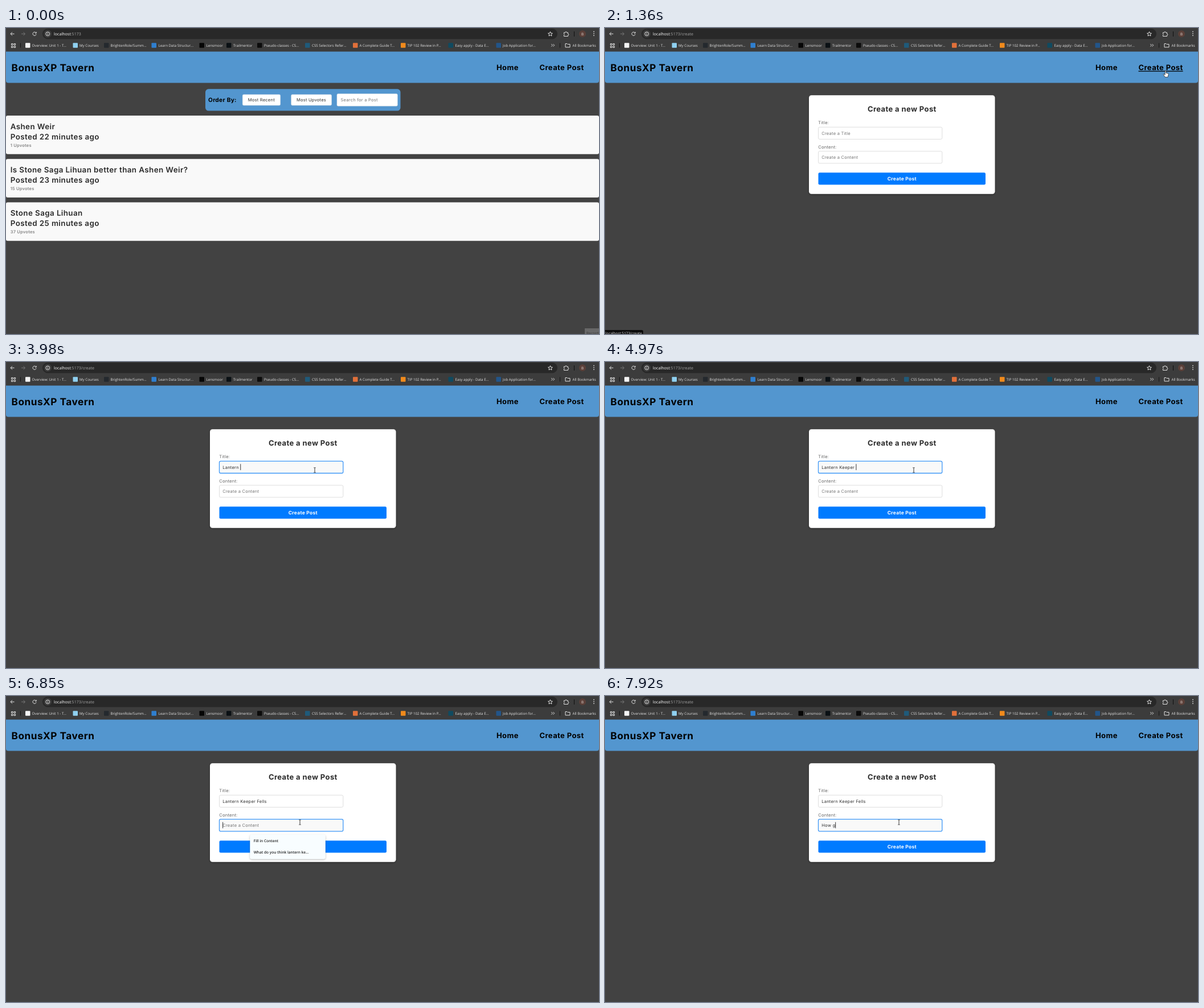
An HTML page for the animation above (7.99 s loop, 1041 by 538 pixels).

```html
<!DOCTYPE html>
<html lang="en">
<head>
<meta charset="utf-8">
<title>Post board</title>
<style>
  html, body { margin: 0; height: 100%; overflow: hidden; background: #424242; }
  svg { display: block; width: 100%; height: 100%; }
  text { font-family: Inter, sans-serif; letter-spacing: .03em; white-space: pre; text-rendering: geometricPrecision; }
  .ui, .ui text { font-family: "Open Sans", "Noto Sans", sans-serif; letter-spacing: 0; }
  .b { font-weight: 700; }
  .s { font-weight: 600; }
  .h2 { font-size: 13.4px; fill: #2b2b2b; }
  .nav { font-size: 13px; }
  .f { font-size: 7.55px; fill: #333; }
  .ph { fill: #777; }
  .line { fill: none; stroke: #e3e3e3; stroke-width: 1; }
  .field { fill: #fff; stroke: #d6d6d6; stroke-width: .8; }
  .field.on { fill: #f9f9f9; stroke: #3d97f7; stroke-width: 1.3; }
  .u { text-decoration: underline; text-decoration-thickness: 1px; }
</style>
</head>
<body>
<svg viewBox="0 0 1041 538" preserveAspectRatio="none">
  <defs>
    <filter id="soft" x="-10%" y="-10%" width="120%" height="130%">
      <feDropShadow dx="0" dy="1.2" stdDeviation="1.6" flood-opacity=".3"/>
    </filter>
  </defs>
  <rect width="1041" height="538" fill="#424242"/>

  <g class="ui" id="chrome">
    <rect width="1041" height="41.5" fill="#3c3c3c"/>
    <rect x="64" y="1" width="904" height="18.5" rx="9.2" fill="#282828"/>
    <path class="line" d="M14.5 10.3H8.3M11 7.3l-3 3 3 3"/>
    <path class="line" style="stroke:#777" d="M27 10.3h6.2M30.5 7.3l3 3-3 3"/>
    <path class="line" d="M52.6 8.4a3.1 3.1 0 1 0 .5 2.6M53.2 6.8v2.3h-2.3"/>
    <circle cx="73.3" cy="10.3" r="6.8" fill="#3c3c3c"/>
    <circle class="line" cx="73.3" cy="10.3" r="3.4" stroke-width=".8"/>
    <path class="line" d="M73.3 9.8v2.4M73.3 8.2v.9"/>
    <text x="84" y="12.9" font-size="7.1" fill="#fff">localhost<tspan id="path" fill="#a5a5a5"></tspan></text>
    <path class="line" stroke-width=".8" d="M955.5 6.5l1.1 2.6 2.8.2-2.1 1.9.7 2.8-2.5-1.5-2.5 1.5.7-2.8-2.1-1.9 2.8-.2z"/>
    <path class="line" d="M979.5 8h2.3a1.3 1.3 0 0 1 2.6 0h2.1v2.2a1.3 1.3 0 0 1 0 2.6v1.7h-7v-2.2a1.2 1.2 0 0 0 0-2.2z"/>
    <path d="M997.5 6v9" stroke="#111"/>
    <circle cx="1012" cy="10.3" r="6" fill="#5b4039"/>
    <text x="1012" y="12.6" font-size="6.2" fill="#e9dcd8" text-anchor="middle">B</text>
    <path d="M1032 6.4v9" stroke="#e3e3e3" stroke-width="1.7" stroke-linecap="round" stroke-dasharray="0 3.4"/>
    <path class="line" d="M9.5 27.5h2.6v2.4H9.5zM14 27.5h2.6v2.4H14zM9.5 32h2.6v2.4H9.5zM14 32h2.6v2.4H14z"/>
    <path d="M25.5 26.5v8M972.5 26.5v8" stroke="#151515"/>
    <path class="line" d="M957.3 28.2l2.2 2.2-2.2 2.2M960.5 28.2l2.2 2.2-2.2 2.2"/>
    <path class="line" stroke-width=".8" d="M982 27.5h3l1 1.1h4v5.2h-8z"/>
    <text x="994.5" y="32.8" font-size="6.2" fill="#e3e3e3">All Bookmarks</text>
  </g>

  <path d="M0 41.5H1041V92.500a4 4 0 0 1-4 4H4a4 4 0 0 1-4-4z" fill="#5396cf"/>
  <text class="b" x="9.500" y="76" font-size="17.2">BonusXP Tavern</text>
  <text class="b nav" id="home" x="861" y="74.300">Home</text>
  <text class="b nav" id="create" x="936.500" y="74.300">Create Post</text>

  <g id="feed">
    <rect x="350" y="107.300" width="342.500" height="38.200" rx="5.500" fill="#5396cf"/>
    <text class="b" x="355" y="130.200" font-size="10.200">Order By:</text>
    <g fill="#fff" stroke="#d5dde5" stroke-width=".6">
      <rect x="415.300" y="117" width="66.300" height="19" rx="2"/>
      <rect x="500.700" y="117" width="70.800" height="19" rx="2"/>
      <rect x="581" y="115.700" width="106.300" height="21.500" rx="2"/>
    </g>
    <text class="f" x="448.300" y="129.200" text-anchor="middle">Most Recent</text>
    <text class="f" x="536" y="129.200" text-anchor="middle">Most Upvotes</text>
    <text class="f ph" x="587.500" y="129.200">Search for a Post</text>
  </g>

  <g id="form">
    <rect x="358" y="118.300" width="326.500" height="173.500" rx="4.500" fill="#fff" filter="url(#soft)"/>
    <text class="b" x="521.300" y="147.200" font-size="13" fill="#2b2b2b" text-anchor="middle">Create a new Post</text>
    <text class="f" x="374.300" y="169" style="fill:#666">Title:</text>
    <text class="f" x="374.300" y="211.500" style="fill:#666">Content:</text>
    <rect x="374.500" y="254.200" width="293.500" height="21.400" rx="2.300" fill="#007bff"/>
    <text class="b" x="521.300" y="268.200" font-size="8.500" fill="#fff" text-anchor="middle">Create Post</text>
  </g>

  <g id="hints" class="ui">
    <rect x="428.300" y="243.500" width="132.500" height="43" rx="3.500" fill="#f8fdff" filter="url(#soft)"/>
    <text class="s" x="434.700" y="257.400" font-size="6.500" fill="#222">Fill in Content</text>
    <text class="s" x="434.700" y="277" font-size="6.500" fill="#222">What do you think lantern ke...</text>
  </g>

  <g id="status" class="ui">
    <rect id="statusBox" x="-3" y="531" height="10" rx="2.500" fill="#0c0c0c"/>
    <text id="statusText" x="1" y="539" font-size="6.400" fill="#e0e0e0"></text>
  </g>
  <g id="tip" class="ui">
    <rect x="1016" y="528" width="26" height="11" fill="#686868"/>
    <text x="1019" y="538.500" font-size="6.500" fill="#333">Record</text>
  </g>

  <g id="cursor">
    <circle id="click" cx="0" cy="-.5" r="6" fill="#c6d600" fill-opacity=".65"/>
    <path id="arrow" d="M0 0v9.600l2.200-2 1.500 3.300 1.500-.700-1.500-3.200h3z" fill="#fff" stroke="#111" stroke-width=".7"/>
    <path id="hand" d="M-.9 6V.6a.9.9 0 0 1 1.800 0V4l3.300.700q1.100.300 1 1.600L4.600 9.200 3.900 11.300H-.7L-3.700 7.200q-.5-1 .5-1.300.9 0 2.300 1.500z" fill="#fff" stroke="#111" stroke-width=".7"/>
    <path id="beam" d="M-1.700-4.200H-.5L0-3.800.5-4.200H1.700M0-3.800V3.800M-1.700 4.200H-.5L0 3.800.5 4.200H1.700" fill="none" stroke="#222" stroke-width=".9"/>
  </g>
</svg>
<script>
const LOOP = 7990, OPEN = 1360;
const $ = id => document.getElementById(id);
const show = (id, on) => $(id).style.opacity = +on;
const clamp = v => Math.max(0, Math.min(1, v));

const bookmarks = [
  [34, 45.5, "#f4f4f4", "Overview: Unit 1 - T..."],
  [117.500, 129, "#8fd0f0", "My Courses"],
  [172, 183.500, "#24292e", "BrightenRole/Summ..."],
  [255.500, 267.500, "#2f7fd0", "Learn Data Structur..."],
  [339.500, 351.500, "#050505", "Lensmoor"],
  [387, 399, "#0a1014", "Trailmentor"],
  [441, 453, "#0b0b0b", "Pseudo-classes - CS..."],
  [525, 537, "#1f5a7a", "CSS Selectors Refer..."],
  [609, 620.500, "#e0703a", "A Complete Guide T..."],
  [693, 704.500, "#f08a1c", "TIP 102 Review in P..."],
  [776.500, 788.500, "#0f4a60", "Easy apply - Data E..."],
  [860.500, 872, "#22558a", "Job Application for..."]
];
$("chrome").innerHTML += bookmarks.map(([ix, x, color, label]) =>
  `<rect x="${ix}" y="26.300" width="8.500" height="8.500" rx="1" fill="${color}"/>
   <text x="${x}" y="32.800" font-size="6.200" fill="#e3e3e3">${label}</text>`).join("");

const posts = [
  ["Ashen Weir", 22, 1],
  ["Is Stone Saga Lihuan better than Ashen Weir?", 23, 15],
  ["Stone Saga Lihuan", 25, 37]
];
$("feed").innerHTML += posts.map(([title, age, votes], i) =>
  `<g transform="translate(0 ${154 + i * 76.250})">
     <rect width="1041" height="67.800" rx="3" fill="#f9f9f9"/>
     <text class="s h2" x="7.700" y="23.800">${title}</text>
     <text class="s h2" x="7.700" y="41.800">Posted ${age} minutes ago</text>
     <text class="s" x="7.700" y="54.600" font-size="7.500" fill="#858585">${votes} Upvote${"s"}</text>
   </g>`).join("");

// Text fields: focus span and the moment of each keystroke
const fields = [
  { y: 174.300, hint: "Create a Title", value: "Lantern Keeper Fells", focus: 2070, blur: 6650,
    keys: [3250, 3320, 3450, 3580, 3710, 3780, 3910, 3980, 4310, 4380, 4510, 4710, 4840, 4920, 4970,
           5300, 5370, 5500, 5570, 5700] },
  { y: 216.700, hint: "Create a Content", value: "How g", focus: 6650, blur: LOOP + 1,
    keys: [7180, 7390, 7520, 7720, 7920] }
];
for (const f of fields) {
  const g = document.createElementNS("http://www.w3.org/2000/svg", "g");
  g.innerHTML = `<rect x="374.500" y="${f.y}" width="217.300" height="21.200" rx="2.300"/>
    <text class="f" x="380.200" y="${f.y + 13.200}"></text>
    <rect y="${f.y + 5}" width=".9" height="10.800" fill="#222"/>`;
  $("form").append(g);
  [f.box, f.text, f.caret] = g.children;
}

function drawField(f, t) {
  const on = t >= f.focus && t < f.blur;
  const n = f.keys.filter(k => k <= t).length;
  f.box.setAttribute("class", on ? "field on" : "field");
  f.text.setAttribute("class", n ? "f" : "f ph");
  f.text.textContent = n ? f.value.slice(0, n) : f.hint;
  const since = t - (n ? f.keys[n - 1] : f.focus);
  f.caret.style.opacity = on && Math.floor(since / 520) % 2 === 0 ? 1 : 0;
  f.caret.setAttribute("x", 380.200 + (n ? f.text.getComputedTextLength() : 0));
}

// Pointer waypoints: time, x, y
const route = [
  [70, 1036, 532], [300, 1000, 330], [550, 925, 150], [760, 886, 76], [880, 886, 75],
  [1100, 984, 75], [1480, 984, 75], [1630, 711, 109], [1850, 600, 165], [2060, 545, 188],
  [2330, 542, 190], [6160, 542, 190], [6220, 528, 208], [6480, 516, 222]
];
function pointer(t) {
  const i = route.findIndex(p => p[0] > t);
  if (i < 0) return route.at(-1).slice(1);
  const [t0, x0, y0] = route[Math.max(0, i - 1)], [t1, x1, y1] = route[i];
  const k = t1 > t0 ? clamp((t - t0) / (t1 - t0)) : 0;
  return [x0 + (x1 - x0) * k, y0 + (y1 - y0) * k];
}

function draw(t) {
  const created = t >= OPEN;
  const [x, y] = pointer(t);
  const inNav = y > 62 && y < 80;
  const onHome = inNav && x > 861 && x < 902;
  const onCreate = inNav && x > 937 && x < 1016;
  const onField = created && x > 374 && x < 592 && fields.some(f => y > f.y && y < f.y + 21.500);
  const hand = onHome || onCreate;

  $("path").textContent = created ? ":5173/create" : ":5173";
  show("feed", !created);
  show("form", created);
  show("tip", t < 130);
  fields.forEach(f => drawField(f, t));
  show("hints", clamp((t - 6680) / 130) * clamp((7390 - t) / 130));

  const deep = t >= 1050;
  $("statusText").textContent = deep ? "localhost:5173/create" : "localhost:5173";
  $("statusBox").setAttribute("width", deep ? 70 : 51);
  show("status", clamp((t - 850) / 100) * clamp((1900 - t) / 200));

  $("home").classList.toggle("u", onHome);
  $("create").classList.toggle("u", onCreate);
  $("cursor").setAttribute("transform", `translate(${x} ${y})`);
  show("cursor", t >= 70);
  show("click", t >= 1160 && t < 1340);
  show("hand", hand);
  show("beam", onField);
  show("arrow", !hand && !onField);
}

function tick() {
  draw(performance.now() % LOOP);
  requestAnimationFrame(tick);
}
tick();
</script>
</body>
</html>
```
